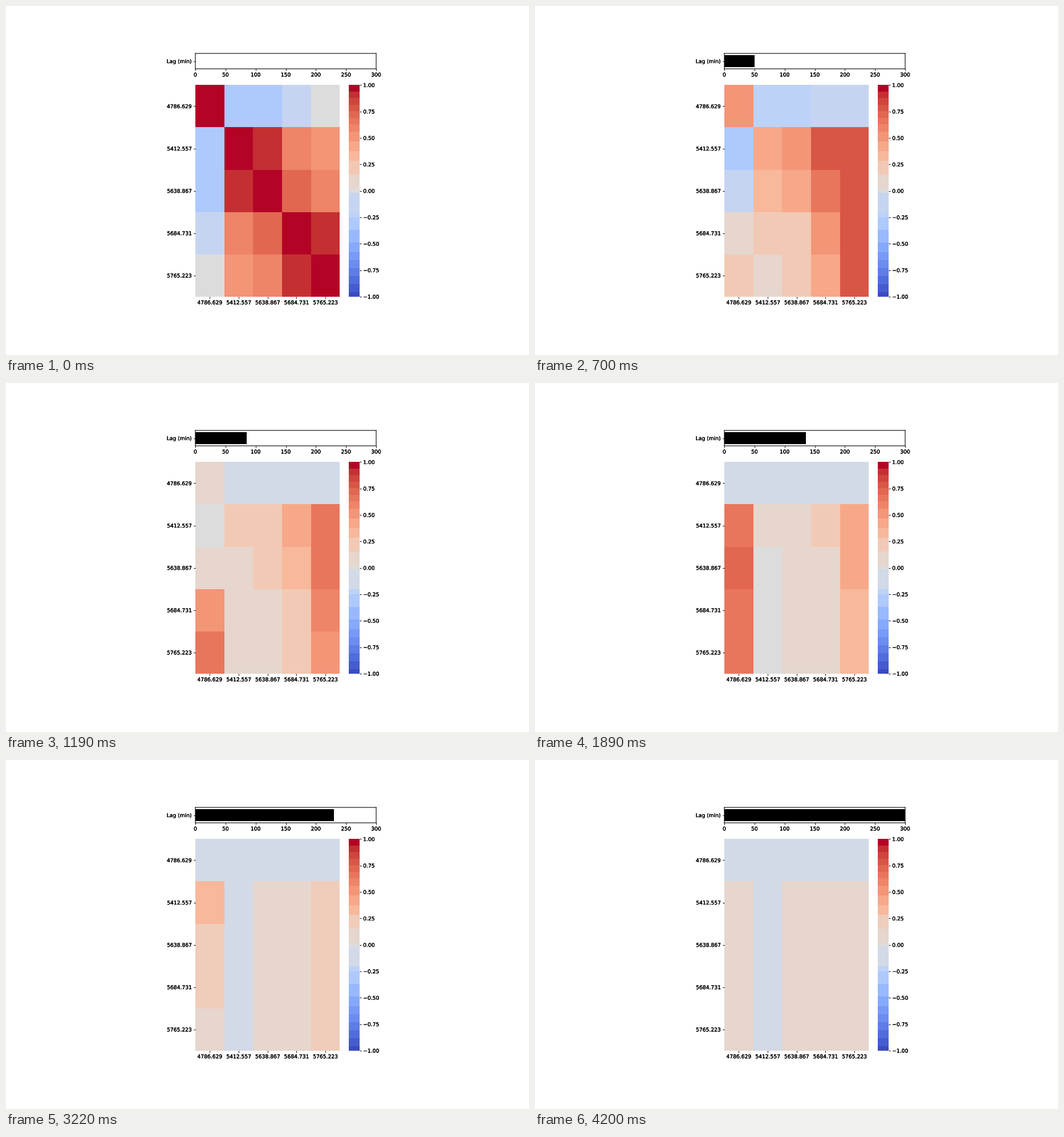
A matplotlib script for the animation above (4270 ms loop, 917 by 611 pixels).

```python
import numpy as np
import matplotlib.pyplot as plt
from matplotlib import patheffects
from matplotlib.animation import FuncAnimation
from matplotlib.colors import BoundaryNorm, ListedColormap, to_rgba

W, H, DPI = 917, 611, 66
FRAMES, STEP, MAX_LAG = 61, 5, 300
LABELS = ["4786.629", "5412.557", "5638.867", "5684.731", "5765.223"]

plt.rcParams.update({"font.family": "DejaVu Sans", "font.size": 10})

# Each series is a pulse: its delay, decay time and long-lag correlation.
DELAY = np.array([150, 0, 10, 35, 42])
DECAY = np.array([70, 48, 42, 50, 90])
FLOOR = np.array([-.05, -.08, .01, .01, .06])
RISE = 58

# Best lag of each pair and the correlation reached there.
PEAK = DELAY[None, :] - DELAY[:, None]
HEIGHT = np.where(PEAK > 0, .74 + .26 * np.exp(-PEAK / 30), .94)
np.fill_diagonal(HEIGHT, 1)

# The first series starts out anticorrelated with the early pulses.
FIRST = -.31 + .00017 * DELAY ** 2
FIRST[0] = 1
BEFORE = np.zeros((5, 5))
BEFORE[:, 0] = FIRST


def corr_at(lag):
    d = lag - PEAK
    shape = np.where(d < 0, np.exp(-(d / RISE) ** 2), 1 / (1 + (d / DECAY) ** 2))
    base = np.where(d < 0, BEFORE, FLOOR)
    corr = base + (HEIGHT - base) * shape
    corr[0] = -.1 + (FIRST + .1) * np.exp(-(lag / 70) ** 2)
    return corr


# Colour bands, wide around zero and narrow towards the ends.
EDGES = np.r_[-1, np.linspace(-.96, -.58, 6), np.linspace(-.49, -.249, 3),
              -.2, -.016, .022, .157,
              np.linspace(.286, .562, 4), np.linspace(.627, 1, 7)]
NORM = BoundaryNorm(EDGES, len(EDGES) - 1)
MID = (EDGES[:-1] + EDGES[1:]) / 2
BASE = plt.get_cmap("coolwarm")((MID + 1) / 2)
BASE[0], BASE[-1] = to_rgba("#3b4cc0"), to_rgba("#b40426")
COOL, WARM, PEACH = np.searchsorted(EDGES, [-.1, .1, .2]) - 1


def mix(a, b, t):
    return np.array(to_rgba(a)) * (1 - t) + np.array(to_rgba(b)) * t


def cmap_at(lag):
    """The faint bands fade a little; the blue one drops once."""
    colors = BASE.copy()
    colors[COOL] = to_rgba("#c5d5f1" if lag < 85 else "#d2d9e7")
    colors[WARM] = to_rgba("#e6d6cd")
    colors[PEACH] = mix("#f3c8b2", "#efcdbc", lag / MAX_LAG)
    return ListedColormap(colors)


fig = plt.figure(figsize=(W / DPI, H / DPI), dpi=DPI, facecolor="white")


def axes_px(x0, y0, x1, y1):
    return fig.add_axes([x0 / W, 1 - y1 / H, (x1 - x0) / W, (y1 - y0) / H])


def mesh(ax, x, y, values):
    ax.spines[:].set_visible(False)
    return ax.pcolormesh(x, y, values, norm=NORM, cmap=cmap_at(0),
                         antialiased=False, linewidth=0)


lag_ax = axes_px(332, 83, 649, 110)
lag_ax.set(xlim=(0, MAX_LAG), ylim=(-.5, .5))
lag_ax.set_yticks([0], ["Lag (min)"])
bar = lag_ax.barh(0, 0, height=.8, color="black", linewidth=0)[0]
for spine in lag_ax.spines.values():
    spine.set(linewidth=1.2, snap=False)

heat_ax = axes_px(332, 138.4, 585.3, 508.8)
heat = mesh(heat_ax, np.arange(6), np.arange(6), corr_at(0))
centers = np.arange(5) + .5
heat_ax.set(xlim=(0, 5), ylim=(5, 0))
heat_ax.set_xticks(centers, LABELS)
heat_ax.set_yticks(centers, LABELS)

scale_ax = axes_px(601.2, 138.4, 619.8, 508.8)
scale = mesh(scale_ax, [0, 1], EDGES, MID[:, None])
scale_ax.set(xlim=(0, 1), ylim=(-1, 1), xticks=[])
scale_ax.yaxis.tick_right()
scale_ax.set_yticks(np.linspace(-1, 1, 9))

# Slightly heavier lettering and ticks.
heavy = [patheffects.withStroke(linewidth=.35, foreground="black")]
for ax in (lag_ax, heat_ax, scale_ax):
    ax.tick_params(width=1.1)
    for label in ax.get_xticklabels() + ax.get_yticklabels():
        label.set_path_effects(heavy)


def update(i):
    lag = i * STEP
    bar.set_width(lag)
    heat.set_array(corr_at(lag))
    cmap = cmap_at(lag)
    heat.set_cmap(cmap)
    scale.set_cmap(cmap)
    return bar, heat, scale


anim = FuncAnimation(fig, update, frames=FRAMES, interval=70, repeat=True,
                     repeat_delay=0, blit=False)
plt.show()
```
